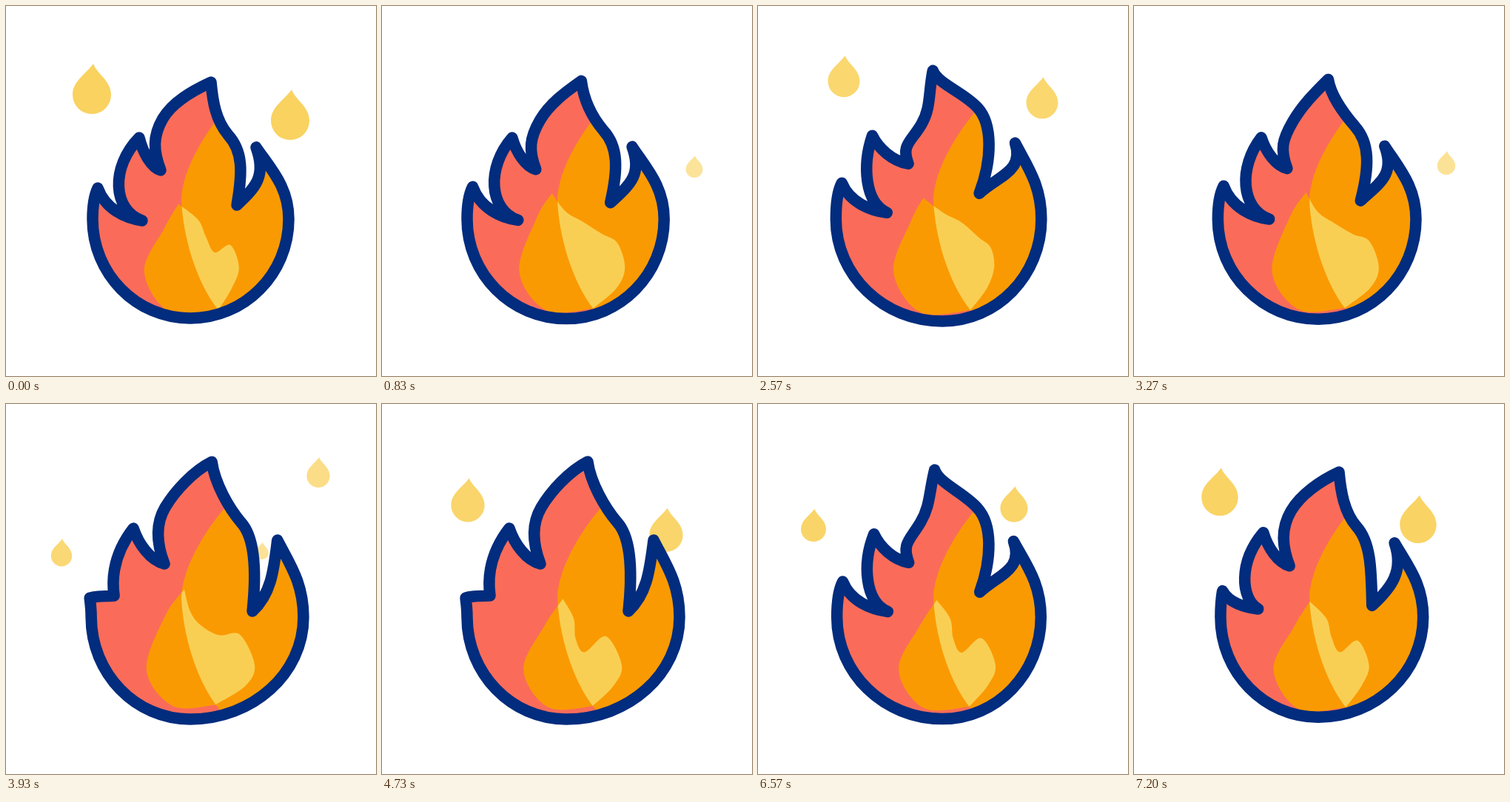
Animation of 500 by 500 pixels, one loop 7.23 s. Source, as an HTML page with a canvas:

```html
<!DOCTYPE html>
<html lang="en">
<head>
<meta charset="utf-8">
<title>Flame</title>
<style>
html, body { margin: 0; width: 100%; height: 100%; overflow: hidden; background: #fff; }
canvas { display: block; width: 100vmin; height: 100vmin; }
</style>
</head>
<body>
<canvas id="stage" width="500" height="500"></canvas>
<script>
const ctx = document.getElementById('stage').getContext('2d');
const LOOP = 7230, FRAMES = 217;
const OUTER = LOOP / 9, INNER = LOOP / 12, DROP = LOOP / 3;
const NAVY = '#022c7d', CORAL = '#fa6c59', ORANGE = '#fa9a02', YELLOW = '#f9cf53';

// Key points: top, shoulder, right notch, right tip, left tip, left notch,
// mid tip, mid notch, neck; then bowl left, right, bottom and the right tip's hook.
const poses = [
  { at: 0, p: [277,103, 300,174, 312,269, 338,191, 124,246, 184,290, 180,178, 209,222, 212,152, 117, 382, 422, 14] },
  { at: 160, p: [236,87, 297,137, 299,253, 348,185, 113,239, 174,279, 154,175, 203,213, 221,160, 105, 383, 426, 12] },
  { at: 307, p: [259,80, 311,138, 308,257, 375,186, 105,231, 171,272, 152,167, 201,206, 228,153, 96, 392, 426, -18] },
  { at: 715, p: [278,78, 318,160, 333,280, 367,184, 113,262, 146,259, 172,168, 214,216, 215,140, 115, 402, 426, -5] },
  { at: 773, p: [277,93, 300,166, 321,272, 351,188, 120,252, 169,278, 175,174, 210,219, 212,145, 117, 390, 423, 14] }
];

// Peak time, height and radius; growing and shrinking spans; rising speed.
const drops = [
  { x: 75, peak: 1660, y: 179, r: 19, grow: 550, shrink: 560, speed: .19 },
  { x: 116, peak: 0, y: 120, r: 26, grow: 680, shrink: 650, speed: .19 },
  { x: 346, peak: 1800, y: 126, r: 21, grow: 480, shrink: 415, speed: .27 },
  { x: 384, peak: 0, y: 155, r: 26, grow: 680, shrink: 650, speed: .25 },
  { x: 422, peak: 1255, y: 132, r: 27.5, grow: 720, shrink: 480, speed: .21 }
];

// Smooth cyclic interpolation between poses.
function poseAt(time) {
  const n = poses.length, t = time % OUTER;
  let k = n - 1;
  while (poses[k].at > t) k--;
  const [a, b, c, d] = [-1, 0, 1, 2].map(i => {
    const j = k + i + n;
    return { at: poses[j % n].at + (Math.floor(j / n) - 1) * OUTER, p: poses[j % n].p };
  });
  const h = c.at - b.at, u = (t - b.at) / h, u2 = u * u, u3 = u2 * u;
  return b.p.map((v, i) =>
    v + (3 * u2 - 2 * u3) * (c.p[i] - v) +
    (u3 - 2 * u2 + u) * (c.p[i] - a.p[i]) * h / (c.at - a.at) +
    (u3 - u2) * (d.p[i] - v) * h / (d.at - b.at));
}

function outerShape(time) {
  const p = poseAt(time);
  const [top, shoulder, notchR, tipR, tipL, notchL, tipM, notchM, neck] =
    Array.from({ length: 9 }, (_, i) => ({ x: p[2 * i], y: p[2 * i + 1] }));
  let [left, right, bottom, hook] = p.slice(18);

  // The bowl swells in the long stretch between the wide and tall poses.
  const s = (time % OUTER - poses[2].at) / (poses[3].at - poses[2].at);
  const puff = s > 0 && s < 1 ? 24 * Math.sin(Math.PI * s) ** 2 : 0;
  left -= puff / 2;
  right += puff;
  bottom += puff / 7;

  const path = new Path2D(), cx = 249, cy = 288, K = .448;
  const curve = (x1, y1, x2, y2, to) => path.bezierCurveTo(x1, y1, x2, y2, to.x, to.y);
  // Controls given as fractions of the chord.
  const bend = (a, b, fx, fy, gx, gy) => {
    const dx = b.x - a.x, dy = b.y - a.y;
    curve(a.x + fx * dx, a.y + fy * dy, b.x - gx * dx, b.y - gy * dy, b);
  };
  const lift = .4 * (top.x - neck.x);

  path.moveTo(top.x, top.y);
  curve(top.x + .1 * (shoulder.x - top.x), top.y + .35 * (shoulder.y - top.y),
    shoulder.x - 17, shoulder.y - 20, shoulder);
  curve(shoulder.x + 20, shoulder.y + 22, shoulder.x + 20, notchR.y - 46, notchR);
  curve(notchR.x + 26, notchR.y - 24, tipR.x + hook, tipR.y + 38, tipR);
  bend(tipR, { x: right, y: cy }, .45, .3, 0, .45);
  curve(right, bottom - K * (bottom - cy), right - K * (right - cx), bottom, { x: cx, y: bottom });
  curve(left + K * (cx - left), bottom, left, bottom - K * (bottom - cy), { x: left, y: cy });
  path.quadraticCurveTo(left, tipL.y + 15, tipL.x, tipL.y);
  bend(tipL, notchL, .17, .65, .37, .07);
  curve(144, notchL.y - 14, 141, tipM.y + 40, tipM);
  bend(tipM, notchM, .17, .45, .45, .1);
  curve(notchM.x - 10, notchM.y - 26, neck.x - 14, neck.y + 24, neck);
  curve(neck.x + 13, neck.y - 22, top.x - lift, top.y + 38 - lift, top);
  path.closePath();
  return path;
}

// Adds a spline through points to a path.
function spline(path, pts) {
  const at = i => pts[Math.max(0, Math.min(pts.length - 1, i))];
  for (let i = 0; i < pts.length - 1; i++) {
    const [a, b, c, d] = [at(i - 1), at(i), at(i + 1), at(i + 2)];
    path.bezierCurveTo(
      b[0] + (c[0] - a[0]) / 6, b[1] + (c[1] - a[1]) / 6,
      c[0] - (d[0] - b[0]) / 6, c[1] - (d[1] - b[1]) / 6, c[0], c[1]);
  }
}

// Every point of the inner flame swings around its rest place.
function innerShape(time) {
  const wave = (mid, amp, peak) => mid + amp * Math.cos(2 * Math.PI * (time - peak) / INNER);
  const tip = [wave(236, 13, 430), wave(259, 8.5, 10)];
  const base = [wave(285, 3, 80), wave(409, 3, 80)];
  const path = new Path2D();
  path.moveTo(...tip);
  spline(path, [
    tip,
    [wave(214, 7, 450), wave(293, 8, 570)],
    [wave(188, 5, 430), 359],
    [wave(223, 4, 400), wave(411, 4, 90)],
    base
  ]);
  spline(path, [
    base,
    [wave(314, 10, 350), 381],
    [wave(325, 12, 355), 353],
    [wave(310, 8, 250), wave(318, 10, 100)],
    [wave(286, 13, 180), wave(322, 14, 540)],
    [wave(267, 9.5, 120), wave(304, 13, 510)],
    [wave(254, 6, 570), wave(284, 6, 545)],
    tip
  ]);
  path.closePath();
  return path;
}

const rightSide = new Path2D(
  'M310 125C270 165 238 222 237 262C239 308 255 370 287 411L310 440H500V0H330Z');
const tear = new Path2D(
  'M.08-1.62C.25-1.1 1-.75 1 0A1 1 0 0 1-1 0C-1-.7-.4-1 .08-1.62Z');

function fill(path, color) {
  ctx.fillStyle = color;
  ctx.fill(path);
}

function drawDrop({ x, peak, y, r, grow, shrink, speed }, time) {
  let t = time % DROP - peak;
  if (t > shrink) t -= DROP;
  if (t <= -grow || t >= shrink) return;
  const size = t < 0 ? 1 + t / grow : (1 - t / shrink) ** .7;
  ctx.save();
  ctx.translate(x, y - t * speed * (t < 0 ? 1 : .62));
  ctx.scale(r * size, r * size);
  ctx.globalAlpha = .92 * Math.sqrt(size);
  fill(tear, YELLOW);
  ctx.restore();
}

function draw(time) {
  ctx.fillStyle = '#fff';
  ctx.fillRect(0, 0, 500, 500);
  drops.forEach(d => drawDrop(d, time));

  const body = outerShape(time), core = innerShape(time);
  ctx.save();
  ctx.clip(body);
  fill(body, CORAL);
  fill(core, ORANGE);
  fill(rightSide, ORANGE);
  ctx.clip(rightSide);
  fill(core, YELLOW);
  ctx.restore();

  ctx.strokeStyle = NAVY;
  ctx.lineWidth = 15.5;
  ctx.lineJoin = 'round';
  ctx.stroke(body);
}

const start = performance.now();
function tick() {
  const t = (performance.now() - start) % LOOP;
  const frame = Math.floor(t * FRAMES / LOOP + .15) % FRAMES;
  draw(frame * LOOP / FRAMES);
  requestAnimationFrame(tick);
}
tick();
</script>
</body>
</html>
```
